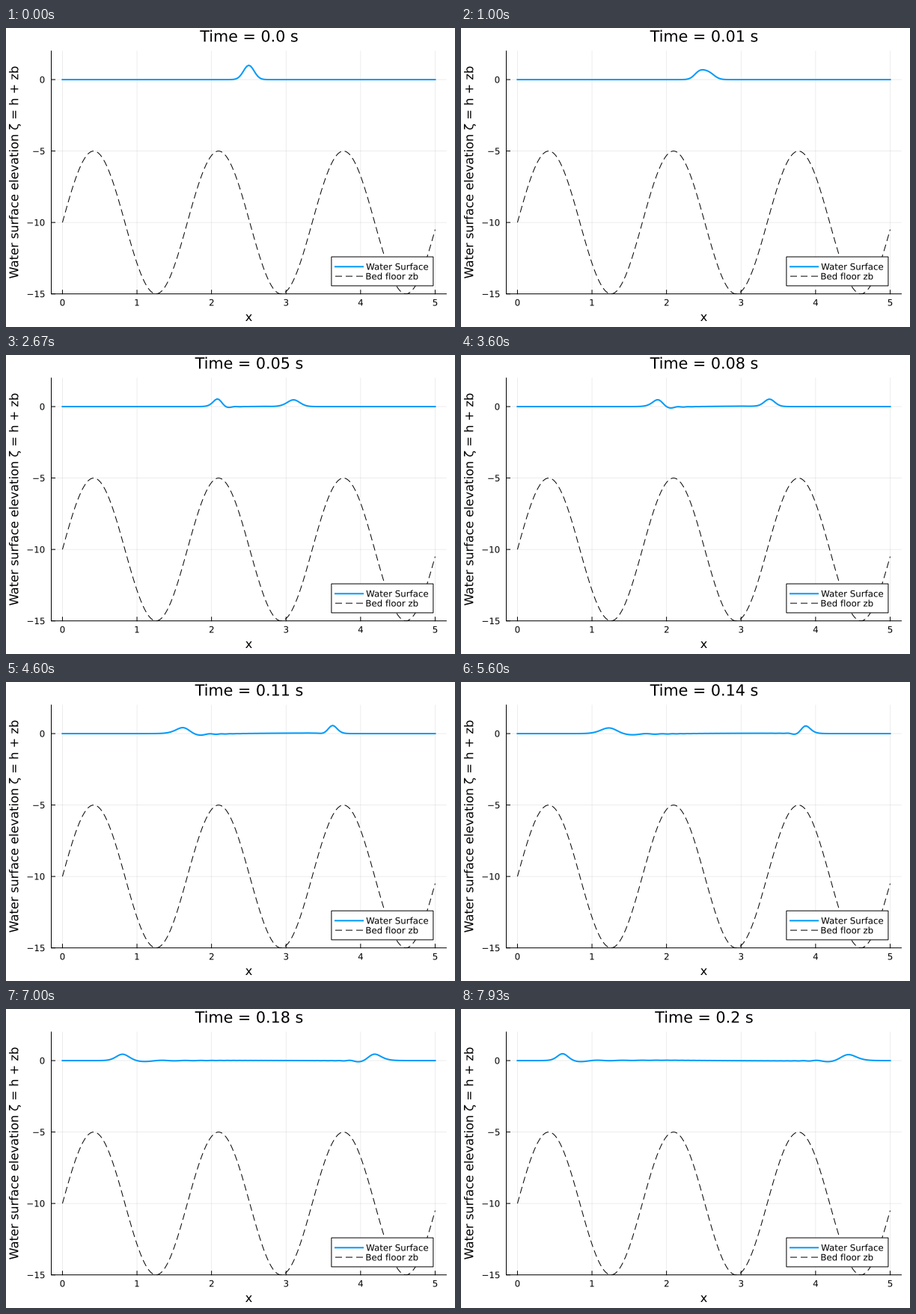
A matplotlib script that plays this animation: 600 px wide and 400 px high, repeating every 8000 ms.

```python
import numpy as np
import matplotlib.pyplot as plt
from matplotlib.animation import FuncAnimation
from matplotlib.patches import PathPatch, Rectangle
from matplotlib.path import Path
from matplotlib.textpath import TextPath

W, H, DPI = 600, 400, 100
FRAMES, LOOP = 120, 8000
G, N = 9.81, 201
BLUE = "#009afa"

plt.rcParams.update({
    "path.simplify": False,
    "path.snap": False,
    "lines.dash_capstyle": "butt",
    "lines.scale_dashes": False,
})


def px(n):
    """Pixels to points."""
    return n * 72 / DPI


def bed(x):
    return 5 * np.sin(3.75 * x) - 10


def clock(k):
    """Simulated time: steps grow from nothing, then surge once midway."""
    if k < 9:
        return 0.0
    u = k - 12
    ramp = (u + np.sqrt(u * u + 6)) / 2
    surge = (0.007 - 0.00011 * (k - 76)) / (1 + np.exp((76 - k) / 3))
    return 0.00187 * ramp + surge


x = np.linspace(0, 5, N)
dx = x[1] - x[0]
zb = bed(x)


def slope(f):
    d = np.zeros_like(f)
    d[1:-1] = (f[2:] - f[:-2]) / (2 * dx)
    return d


def rate(s):
    zeta, u = s
    return -np.array([slope((zeta - zb) * u), slope(u * u / 2 + G * zeta)])


def advance(s, dt):
    a = rate(s)
    b = rate(s + dt / 2 * a)
    c = rate(s + dt / 2 * b)
    d = rate(s + dt * c)
    return s + dt / 6 * (a + 2 * b + 2 * c + d)


def solve():
    s = np.array([np.exp(-100 * (x - 2.5) ** 2), np.zeros(N)])
    out = [s[0]]
    for k in range(1, FRAMES):
        dt = (clock(k) - clock(k - 1)) / 2
        if dt > 0:
            s = advance(advance(s, dt), dt)
        out.append(s[0])
    return out


surface = solve()

# The whole stage is one axes in pixels, y pointing down.
fig = plt.figure(figsize=(W / DPI, H / DPI), dpi=DPI, facecolor="white")
ax = fig.add_axes([0, 0, 1, 1])
ax.set_xlim(0, W)
ax.set_ylim(H, 0)
ax.axis("off")

LEFT, RIGHT, TOP, BOTTOM = 60.5, 588.4, 30.8, 355.7
MID_X, MID_Y = (LEFT + RIGHT) / 2, (TOP + BOTTOM) / 2
TICK, GUIDE, TITLE = 11.8, 16.25, 20.7
DASH = dict(linestyle=(0, (px(9), px(5))))


def to_x(v):
    return LEFT + (v + 0.15) * (RIGHT - LEFT) / 5.3


def to_y(v):
    return BOTTOM - (v + 15) * (BOTTOM - TOP) / 17


def line(xs, ys, width=1.0, color="black", **kw):
    return ax.plot(xs, ys, lw=px(width), color=color, **kw)[0]


def outline(x0, y0, s, size, align=0.5, upright=False):
    """Glyph outlines on the baseline y0; align is the share left of x0."""
    path = TextPath((0, 0), s, size=size, prop={"family": "DejaVu Sans"})
    box = path.get_extents()
    right = path.vertices[:, 0] - box.x0 - align * box.width
    up = path.vertices[:, 1]
    if upright:
        pts = np.column_stack([x0 - up, y0 - right])
    else:
        pts = np.column_stack([x0 + right, y0 - up])
    return Path(pts, path.codes)


def label(*args, **kw):
    patch = PathPatch(outline(*args, **kw), fc="black", lw=0, zorder=7)
    return ax.add_patch(patch)


for v in range(6):
    p = to_x(v)
    line([p, p], [TOP, BOTTOM], 0.7, alpha=0.1, zorder=1)
    line([p, p], [BOTTOM, BOTTOM - 5], zorder=2)
    label(p, 371.5, str(v), TICK)

for v in (-15, -10, -5, 0):
    p = to_y(v)
    line([LEFT, RIGHT], [p, p], 0.7, alpha=0.1, zorder=1)
    line([LEFT, LEFT + 5], [p, p], zorder=2)
    label(51.4, p + 4.4, str(v).replace("-", "\u2212"), TICK, align=1)

line([LEFT, LEFT, RIGHT], [TOP, BOTTOM, BOTTOM], zorder=2)

label(MID_X, 392, "x", GUIDE)
label(16.3, MID_Y, "Water surface elevation \u03b6 = h + zb", GUIDE,
      upright=True)
title = label(MID_X, 18.3, "Time", TITLE)

wave = line(to_x(x), to_y(surface[0]), 2, BLUE, zorder=3)
floor = line(to_x(x), to_y(zb), **DASH, zorder=4)
floor.set_clip_path(Rectangle((LEFT, TOP), RIGHT - LEFT, BOTTOM - TOP + 0.5,
                              transform=ax.transData))

ax.add_patch(Rectangle((434.9, 306.1), 136, 38.8, fc="white", ec="black",
                       lw=px(1), zorder=5))
line([440, 477], [319.3, 319.3], 2, BLUE, zorder=6)
line([440, 477], [332.1, 332.1], **DASH, zorder=6)
label(481.5, 323.5, "Water Surface", TICK, align=0)
label(481.5, 336.4, "Bed floor zb", TICK, align=0)


def draw(k):
    wave.set_ydata(to_y(surface[k]))
    now = f"Time = {round(float(clock(k)), 2)} s"
    title.set_path(outline(MID_X, 18.3, now, TITLE))
    return wave, title


anim = FuncAnimation(fig, draw, frames=FRAMES, interval=LOOP / FRAMES,
                     repeat=True, repeat_delay=0, blit=False)
plt.show()
```
